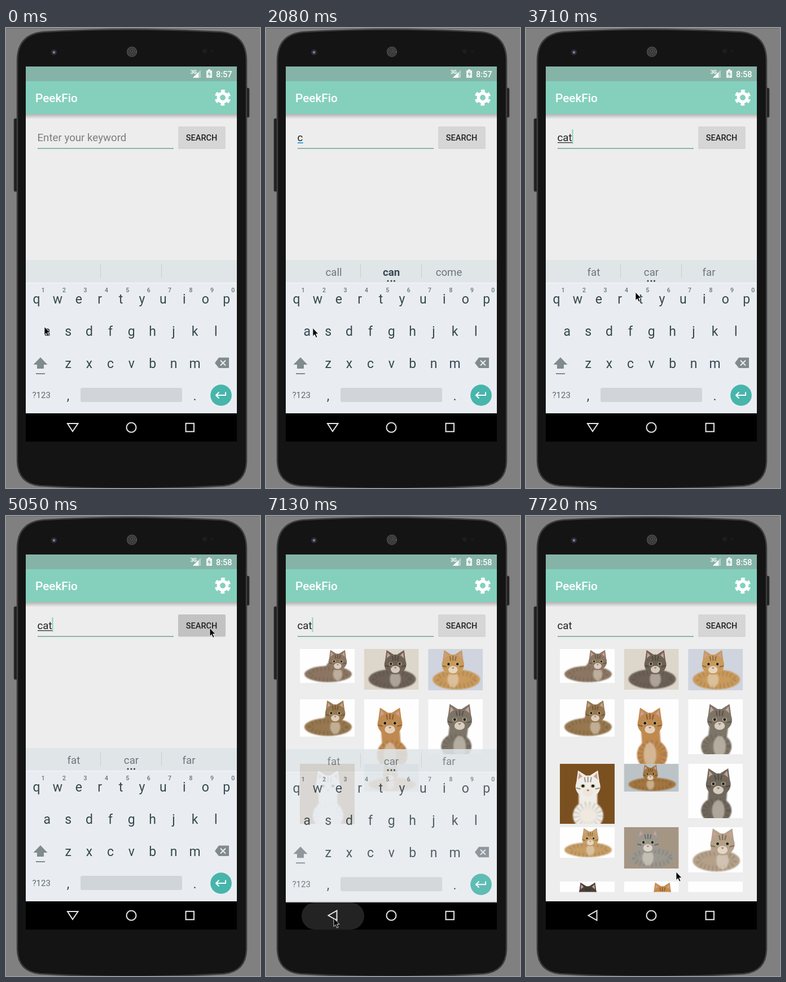
Write an HTML page that moves like this. It is 450 by 813 pixels and loops after 8 s.

```html
<!DOCTYPE html>
<html>
<head>
<meta charset="utf-8">
<style>
html, body { margin: 0; width: 100%; height: 100%; overflow: hidden; background: #808080; }
svg { display: block; }
text { font-family: Roboto, sans-serif; }
.mid { text-anchor: middle; }
.field { font-size: 18.7px; }
</style>
</head>
<body>
<svg id="stage" width="450" height="813" viewBox="0 0 450 813">
  <defs>
    <linearGradient id="shade" x2="0" y2="1">
      <stop stop-color="#000" stop-opacity=".25"/><stop offset="1" stop-color="#000" stop-opacity="0"/>
    </linearGradient>
    <filter id="soft"><feGaussianBlur stdDeviation=".9"/></filter>
    <clipPath id="view"><rect id="viewBox" x="35" y="152" width="374" height="240"/></clipPath>
    <clipPath id="panel"><rect x="35" y="400" width="374" height="283"/></clipPath>
  </defs>

  <!-- phone -->
  <path d="M0 .5H450" stroke="#686868"/>
  <rect x="14" y="160" width="8" height="129" rx="2" fill="#202020" stroke="#484848"/>
  <rect x="424" y="106" width="7" height="52" rx="2" fill="#202020" stroke="#484848"/>
  <path d="M20 56Q21 11 66 7Q223-2 381 7Q425 11 426 56V766Q425 805 386 809Q223 819 60 809Q21 805 20 766Z"
    fill="#141414" stroke="#3c3c3c" stroke-width="2.5"/>
  <circle cx="85" cy="43" r="5" fill="#30303c"/><circle cx="85" cy="43" r="2" fill="#8888a4"/>
  <circle cx="223" cy="42" r="9.5" fill="#2c2c2c"/>
  <g fill="none" stroke="#6a6a6a" stroke-width="1.6" stroke-dasharray="1.6 1.4">
    <circle cx="223" cy="42" r="8"/><circle cx="223" cy="42" r="5"/><circle cx="223" cy="42" r="2"/>
  </g>
  <circle cx="352" cy="41" r="4" fill="#1d1d1d"/><circle cx="365" cy="41" r="2" fill="#1d1d1d"/>

  <!-- app -->
  <rect x="35" y="68" width="374" height="663" fill="#ededed"/>
  <rect x="35" y="152" width="374" height="9" fill="url(#shade)"/>
  <rect x="35" y="68" width="374" height="26" fill="#85b3a7"/>
  <rect x="35" y="94" width="374" height="58" fill="#84d0bd"/>
  <g fill="#fff">
    <text x="327" y="81" font-size="9" font-weight="700" letter-spacing="-.5">3G</text>
    <path d="M345 74V88H331Z" opacity=".4"/><path d="M341 78V88H331Z"/>
    <path d="M355 75H358V73H362V75H365V88H355Z" opacity=".85"/>
    <path d="M361 76L357 82H360L359 87L363 80.5H360Z" fill="#85b3a7"/>
    <text id="clock" x="372" y="87" font-size="14.5" font-weight="500"></text>
    <text x="52" y="131" font-size="20.8" font-weight="500">PeekFio</text>
  </g>
  <g fill="none" stroke="#fff">
    <circle cx="384" cy="123" r="7.7" stroke-width="5.5"/>
    <circle cx="384" cy="123" r="12" stroke-width="4.5" stroke-dasharray="6.5 6.066" stroke-dashoffset="-3.03"/>
  </g>

  <text id="hint" class="field" x="55.5" y="200" fill="#7d7d7d">Enter your keyword</text>
  <text id="typed" class="field" x="55.5" y="200" fill="#222"></text>
  <rect id="mark" x="56"/>
  <rect id="caret" y="179" width="1.8" height="26" fill="#84d0bd"/>
  <rect x="56" y="212" width="241" height="1.5" fill="#6ba696"/>
  <rect x="305" y="175" width="84" height="38.5" rx="2" fill="#cbcbcb"/>
  <rect id="button" x="305" y="174" width="84" height="38.5" rx="2"/>
  <text class="mid" x="346.5" y="199" font-size="14.5" font-weight="500" fill="#222">SEARCH</text>

  <g id="photos" clip-path="url(#view)"></g>

  <!-- navigation bar -->
  <rect x="35" y="681" width="374" height="50"/>
  <rect id="ripple" x="63" y="683" width="111" height="48" rx="24" fill="#232323"/>
  <g fill="none" stroke="#e6e6e6" stroke-width="2">
    <path id="back"/>
    <circle cx="222" cy="706" r="8.5"/>
    <rect x="318.5" y="698.8" width="14.5" height="14.5"/>
  </g>

  <g clip-path="url(#panel)">
    <g id="keyboard">
      <rect x="35" y="410" width="374" height="271" fill="#e9edf1"/>
      <rect x="35" y="410" width="374" height="40" fill="#e0e5e8"/>
      <path d="M35 450.5H409" stroke="#f5f7f8"/>
      <path d="M167.5 417V442M275.5 417V442" stroke="#c8ced1"/>
      <g id="words" class="mid field">
        <text x="120" y="437.5"></text><text x="222" y="437.5"></text><text x="324" y="437.5"></text>
      </g>
      <path id="dots" d="M216 447h.01M222 447h.01M227.5 447h.01" stroke="#37474f" stroke-width="3.2" stroke-linecap="round"/>
      <g id="keys" class="mid" fill="#37474f" font-size="23"></g>
      <path d="M61 582L73.5 595H67V602H55V595H48.5ZM53 610H69V612H53Z" fill="#808a8f"/>
      <path d="M370 592L377 582.5H395V601H377Z" fill="#808a8f"/>
      <path d="M380 587.5L389 596.5M389 587.5L380 596.5" stroke="#e9edf1" stroke-width="2"/>
      <text x="46.5" y="654" font-size="15" fill="#5d6a70">?123</text>
      <rect x="132" y="636" width="180" height="25" rx="3" fill="#d0d5d9"/>
      <circle cx="381" cy="649" r="18.8" fill="#47b5ab"/>
      <path d="M389 643.5V649H372.5M377.5 643.5L372 649L377.5 654.5" fill="none" stroke="#fff" stroke-width="2"/>
      <g id="popup">
        <rect x="-27" y="-66" width="54" height="84" rx="3" fill="#f4f6f7" stroke="#d3d9dc"/>
        <text class="mid" y="-28" font-size="28" fill="#37474f"></text>
      </g>
    </g>
  </g>
  <path id="cursor" d="M0 0V14.5L3.2 11.5L5.7 17L8 16L5.6 10.5H10Z" stroke="#fff" stroke-width=".8"/>
</svg>
<script>
const $ = id => document.getElementById(id);
const set = (id, attrs) => { for (const k in attrs) $(id).setAttribute(k, attrs[k]); };
const show = (id, on) => set(id, { visibility: on ? 'visible' : 'hidden' });
const latest = (list, t) => list.filter(item => t >= item[0]).pop();

// Letters per row, with the row's indent in key widths
const PITCH = 37.4;
const keyAt = {};
let keys = '';
[['qwertyuiop', 0], ['asdfghjkl', .5], ['zxcvbnm', 1.5], [',     .', 1.5]].forEach(([letters, indent], row) =>
  [...letters].forEach((ch, i) => {
    const x = 54 + (indent + i) * PITCH, y = 487 + 57 * row;
    keyAt[ch] = [x, y];
    keys += `<text x="${x}" y="${y}">${ch}</text>`;
    if (!row) keys += `<text x="${x + 11.7}" y="467" font-size="10.5" font-weight="500" fill="#66737a">${(i + 1) % 10}</text>`;
  }));
$('keys').innerHTML = keys;

// Photos: height, fur, backdrop. Tall ones sit, low ones lie down.
const rowTop = [235, 324, 438, 550, 646];
const cats = [
  [60, '#8c7663'], [72, '#6d6156', '#ddd6ca'], [73, '#c99a5c', '#cfd4df'],
  [66, '#96774f'], [114, '#c0894f'], [97, '#7d7468'],
  [106, '#f0ece6', '#7b5020'], [49, '#a2753f', '#bcc3c6'], [96, '#6f675c'],
  [54, '#c69d64'], [73, '#9b9890', '#a59583'], [80, '#b5a18a'],
  [60, '#4a4038'], [60, '#c68a4a'], [130, '#c9bda8']
];
const face = [-1, 1].map(s => `
  <path d="M${-s * .15} -.7L${s * .8} -1.3L${s * .95} -.2Z"/>
  <path d="M${s * .4} -.75L${s * .72} -1.1L${s * .8} -.5Z" fill="#c9a094"/>`).join('') + `
  <ellipse rx="1" ry=".9"/>
  <path d="M0 -.8V-.35M-.28 -.75L-.2 -.35M.28 -.75L.2 -.35M-.95 .1L-.6 .2M.95 .1L.6 .2" stroke="#2c2118" stroke-width=".1" opacity=".4"/>
  <ellipse cy=".45" rx=".42" ry=".33" fill="#eee5d8" opacity=".8"/>
  <path d="M-.13 .25H.13L0 .4Z" fill="#a86f62"/>` + [-1, 1].map(s => `
  <ellipse cx="${s * .4}" cy="-.05" rx=".18" ry=".15" fill="#b7b184"/>
  <circle cx="${s * .4}" cy="-.05" r=".11" fill="#1c1a17"/>`).join('');

function photo([h, fur, backdrop = '#fefefe'], i) {
  const sits = h > 85, turn = (.9 + i * .618) % 1;
  const x = 40 + turn * (sits ? 16 : 30), y = h * .38, r = sits ? 22 : h * .27;
  const by = h * (sits ? .86 : .74), rx = sits ? 27 : 42, ry = h * .24;
  return `<svg x="${60 + i % 3 * 113.6}" y="${rowTop[i / 3 | 0]}" width="97" height="${h}">
    <rect width="97" height="${h}" fill="${backdrop}"/>
    <g fill="${fur}" filter="url(#soft)">
      <path d="M${x} ${y}L50 ${by}" stroke="${fur}" stroke-width="${r * 1.5}"/>
      <ellipse cx="50" cy="${by}" rx="${rx}" ry="${ry}"/>
      <ellipse cx="50" cy="${by}" rx="${rx * .75}" ry="${ry * .7}" fill="none" stroke="#2c2118" stroke-width="${ry * .5}" stroke-dasharray="2 5" opacity=".2"/>
      <ellipse cx="${x}" cy="${by}" rx="${r * .5}" ry="${ry * .8}" fill="#eee5d8" opacity=".5"/>
    </g>
    <g fill="${fur}" transform="translate(${x} ${y}) scale(${r})">${face}</g>
  </svg>`;
}
$('photos').innerHTML = cats.map(photo).join('');

// Pointer moves: departure, arrival, x, y
const moves = [
  [-1, 0, 68, 528], [445, 1340, 180, 590], [1640, 2670, 84, 531], [2680, 3270, 194, 467],
  [3720, 4310, 361, 198], [5950, 7130, 120, 711], [7135, 7720, 266, 629]
];
// Eases out with a slight overshoot
const ease = k => 1 + 2.4 * (k - 1) ** 3 + 1.4 * (k - 1) ** 2;
function pointer(t) {
  const i = moves.filter(m => t >= m[0]).length - 1;
  const [from, to, ...end] = moves[i];
  const start = moves[Math.max(0, i - 1)].slice(2);
  const k = ease(Math.min(1, (t - from) / (to - from)));
  return end.map((v, axis) => start[axis] + (v - start[axis]) * k);
}

const presses = [[1480, 'c'], [2520, 'a'], [3560, 't']];
const suggestions = [[0, ',,'], [1630, 'call,can,come'], [2670, 'came,can,car'], [3710, 'fat,car,far']];
const caretStarts = [[-700], ...presses, [3750]];
const CLOSE = 7132, STEP = 148.5;

function draw(now) {
  // Everything advances in even steps
  const t = Math.floor((now % 8000 + 8) / STEP) * STEP + 5;
  const typed = presses.filter(p => t >= p[0]).map(p => p[1]).join('');
  const done = typed === 'cat', closing = t >= CLOSE;
  const k = closing ? Math.min(1, (t - CLOSE) / 290) : 0;

  $('clock').textContent = t < 2220 ? '8:57' : '8:58';
  show('hint', !typed);
  $('typed').textContent = typed;
  const width = typed ? $('typed').getComputedTextLength() : 0;
  set('mark', { y: 202, width, height: done ? 1.2 : 2, fill: done ? '#222' : '#2fa9e0' });
  show('mark', typed && !closing);
  set('caret', { x: 55.5 + width });
  show('caret', (t - latest(caretStarts, t)[0]) % 1000 < 500);
  set('button', { fill: t > 5040 && t < 5330 ? '#c2c2c2' : '#d6d6d6' });

  // Photos load in order as room appears
  const loaded = t < 5630 ? 0 : !closing ? 6 : k < .1 ? 8 : cats.length;
  [...$('photos').children].forEach((el, i) => el.setAttribute('visibility', i < loaded ? 'visible' : 'hidden'));
  set('viewBox', { height: closing ? 512.5 : 240 });

  const words = latest(suggestions, t)[1].split(',');
  [...$('words').children].forEach((el, i) => {
    const bold = i === 1 && !done;
    el.textContent = words[i];
    el.setAttribute('font-weight', bold ? 700 : 400);
    el.setAttribute('fill', bold ? '#37474f' : '#6b777c');
  });
  show('dots', words[1]);

  const press = presses.find(p => t >= p[0] && t < p[0] + 140);
  show('popup', press);
  if (press) {
    set('popup', { transform: `translate(${keyAt[press[1]]})` });
    $('popup').lastElementChild.textContent = press[1];
  }

  set('keyboard', { opacity: closing ? .86 * (1 - k) : 1, transform: `translate(0 ${closing ? 2 + 40 * k : 0})` });
  show('ripple', t >= 6970 && t < 7410);
  set('back', { d: closing ? 'M125.5 697.5V714.5L110.5 706Z' : 'M109 699H127.5L118 713Z' });
  set('cursor', { transform: `translate(${pointer(t)})` });
}

function loop() {
  draw(performance.now());
  requestAnimationFrame(loop);
}
loop();
</script>
</body>
</html>
```
